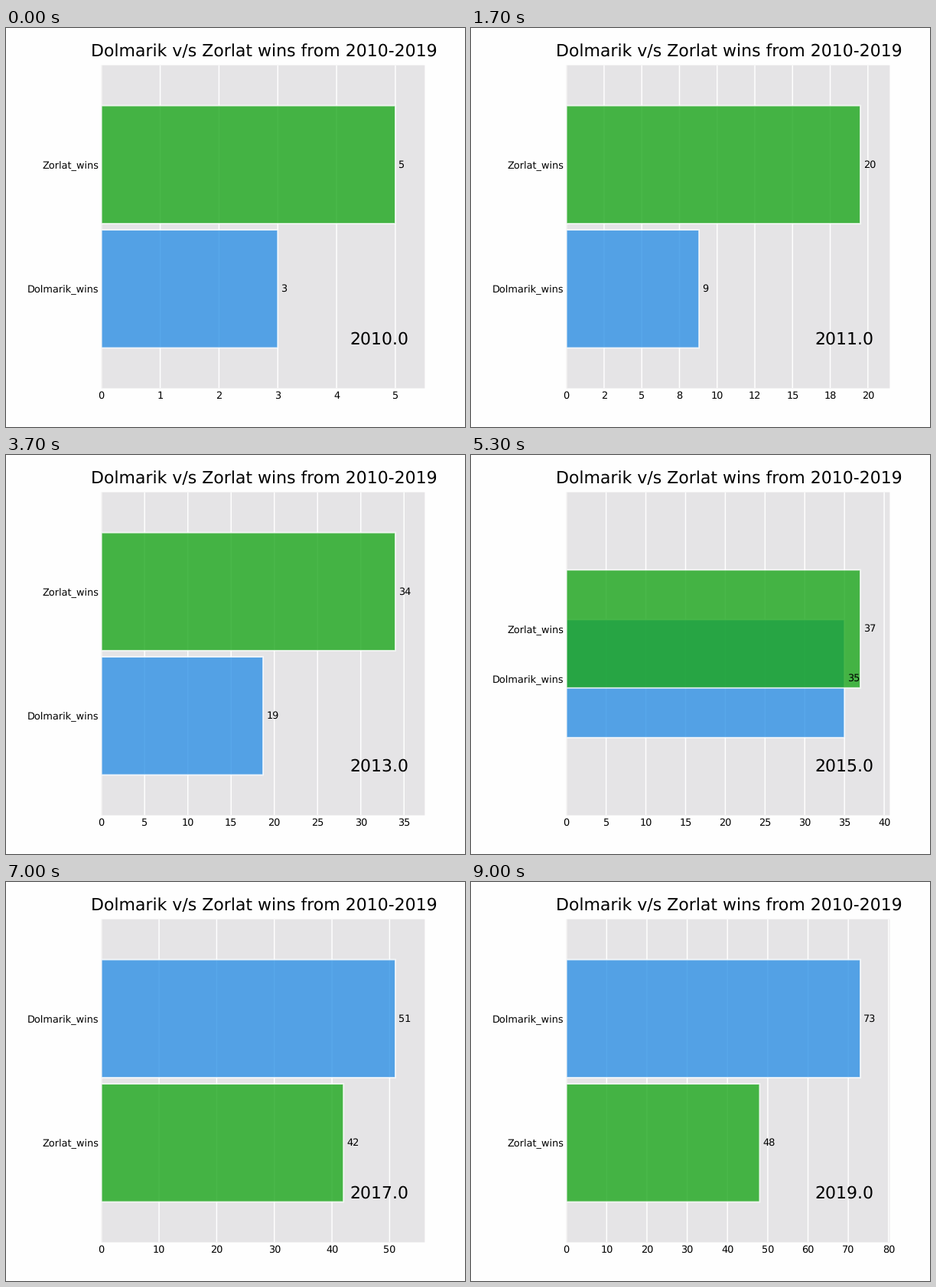
These frames come from a looping animation (600x522 px, 9100 ms). A matplotlib script:

```python
import numpy as np
import matplotlib.pyplot as plt
from matplotlib.animation import FuncAnimation

plt.rcParams.update({
    "font.family": "DejaVu Sans",
    "text.hinting": "none",
    "path.snap": False,
})

DPI = 132
W, H = 600, 522
LEFT, BOTTOM, SIDE = 124.7, 50.6, 422.7
STEPS = 10
YEARS = np.arange(2010, 2020)
NAMES = ["Dolmarik_wins", "Zorlat_wins"]
COLORS = ["#2E91E5", "#1CA71C"]
WINS = np.array([
    [3, 6, 10, 11, 22, 32, 42, 51, 62, 73],
    [5, 16, 21, 34, 34, 37, 37, 42, 47, 48],
])
RANKS = WINS.argsort(axis=0).argsort(axis=0) + 1
KEYS = np.arange(len(YEARS)) * STEPS
Y_MIN, Y_MAX = 0.2, 2.8
BAR_H = 0.95


def at(rows, i):
    return np.array([np.interp(i, KEYS, row) for row in rows])


fig = plt.figure(figsize=(W / DPI, H / DPI), dpi=DPI, facecolor="#fefefe")
ax = fig.add_axes([LEFT / W, BOTTOM / H, SIDE / W, SIDE / H],
                  facecolor="#e5e4e6")
ax.grid(True, axis="x", color="white", linewidth=0.8)
ax.set_axisbelow(True)
ax.tick_params(length=0, labelsize=7, pad=2)
ax.xaxis.set_major_formatter("{x:,.0f}")
ax.spines[:].set_visible(False)
ax.set_title("Dolmarik v/s Zorlat wins from 2010-2019", size=12, pad=6.5,
             x=(564 - LEFT) / SIDE, ha="right")

bars = ax.barh(RANKS[:, 0], WINS[:, 0], height=BAR_H, color=COLORS,
               ec="white", lw=1, alpha=0.8)
ax.set_ylim(Y_MIN, Y_MAX)
labels = [ax.text(0, 0, "", size=7, va="center", transform=ax.transAxes)
          for _ in NAMES]
year = ax.text(0.95, 0.15, "", size=12, ha="right", va="center",
               transform=ax.transAxes)


def update(i):
    wins, pos = at(WINS, i), at(RANKS, i)
    x_max = wins.max() * 1.1
    ax.set_xlim(0, x_max)
    ax.set_yticks(pos, NAMES)
    for bar, label, n, y in zip(bars, labels, wins, pos):
        bar.set_width(n)
        bar.set_y(y - BAR_H / 2)
        label.set_position((n / x_max + 0.01, (y - Y_MIN) / (Y_MAX - Y_MIN)))
        label.set_text(f"{n:,.0f}")
    year.set_text(f"{YEARS[i // STEPS]:.1f}")
    return [*bars, *labels, year]


anim = FuncAnimation(fig, update, frames=KEYS[-1] + 1, interval=100,
                     repeat=True, repeat_delay=0, blit=False)
plt.show()
```
